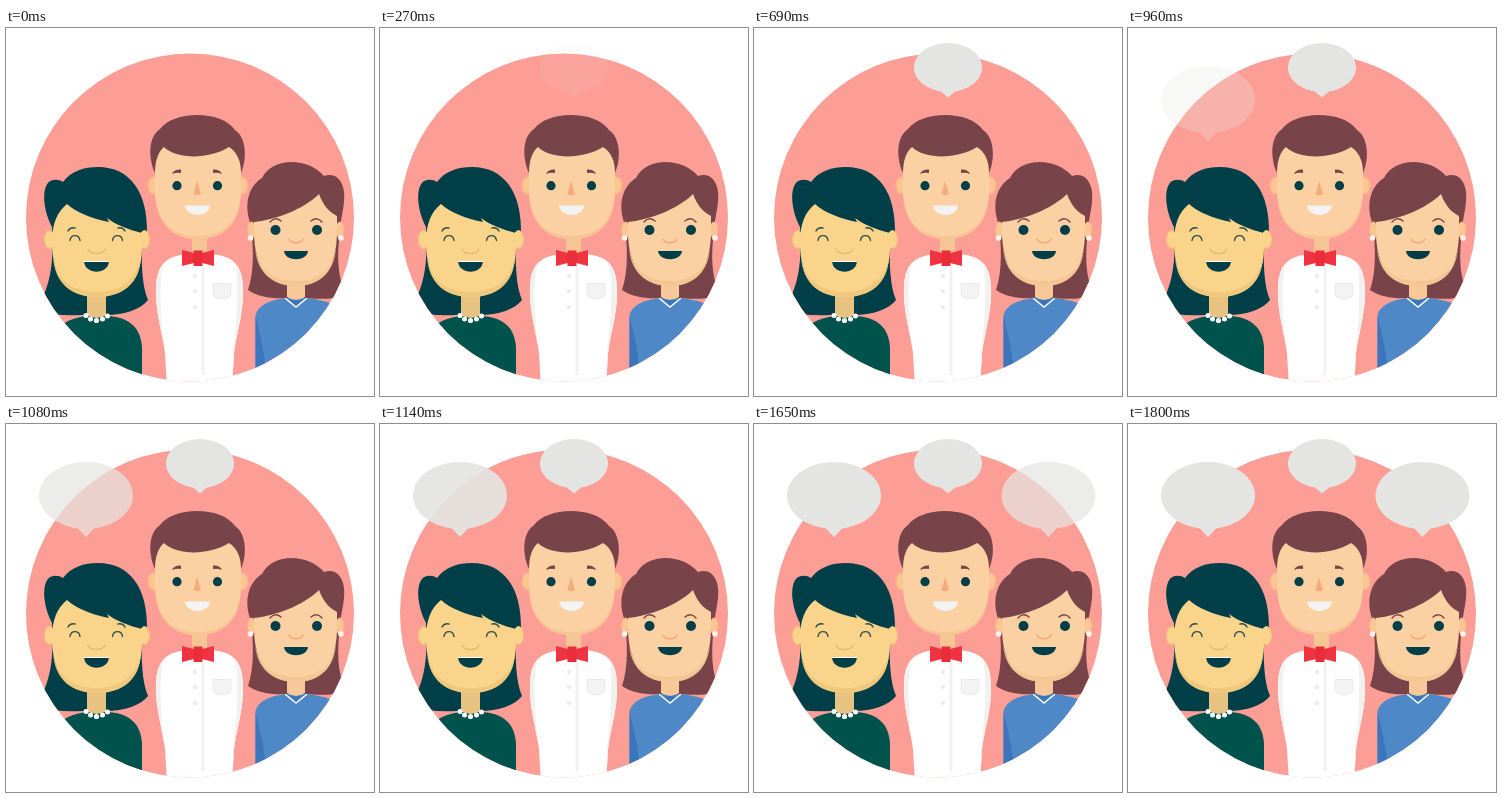
These frames come from a looping animation (368x368 px, 2100 ms). An HTML page:

```html
<!DOCTYPE html>
<html lang="en">
<head>
<meta charset="utf-8">
<title>Three people talking</title>
<style>
html, body { margin: 0; width: 100%; height: 100%; overflow: hidden; background: #fff; }
svg { display: block; width: 100%; height: 100%; }
.line { fill: none; stroke-width: 1.4; stroke-linecap: round; }
</style>
</head>
<body>
<svg viewBox="0 0 368 368">
  <defs><clipPath id="disc"><circle cx="184" cy="189.5" r="164"/></clipPath></defs>
  <circle cx="184" cy="189.5" r="164" fill="#fc9e96"/>

  <g clip-path="url(#disc)">
    <g id="man">
      <path fill="#fff" d="M186 226C165 227 150 232 150 261C149 282 156 303 159 325L161 360H226L228 325C231 303 238 284 237 261C237 232 222 227 201 226Z"/>
      <path fill="#f1f1f2" d="M229 236C235 243 237 251 237 264C237 284 231 303 228 325L227 342C226 319 231 300 231 276C231 260 232 247 229 236ZM157 238C151 245 150 253 150 264C150 281 154 297 157 313C156 292 152 261 157 238Z"/>
      <path fill="#f1f1f2" d="M195.500 238H198.500V347H195.500Z"/>
      <path fill="#f3f3f4" stroke="#e9eaeb" d="M207 255.500H225V266Q225 270 216 271Q207 270 207 266Z"/>
      <g fill="#eeeeef"><circle cx="189" cy="248" r="2.300"/><circle cx="189" cy="263" r="2.300"/><circle cx="189" cy="279" r="2.300"/></g>
      <path fill="#f6c594" d="M186 204H201V226H186Z"/>
      <path fill="#ef3340" d="M176 222L188 225H196L208 222V238L196 235H188L176 238Z"/>
      <path fill="#e92d3b" d="M187.500 222.500H196.500V238H187.500Z"/>
      <g fill="#fcc594" stroke="#f5b584" stroke-width="1.300"><ellipse cx="147.500" cy="157.500" rx="5.500" ry="8.500"/><ellipse cx="236.500" cy="157.500" rx="5.500" ry="8.500"/></g>
      <path fill="#784449" d="M149 145C143 132 141 110 154 101C161 92 175 87 191 87S222 92 229 102C241 110 241 132 235 145Z"/>
      <path fill="#fbd0a2" d="M149 145C149 133 152 124 158 119C170 131 202 132 223 119C231 124 235 133 235 145V162C235 195 217 211 192 211S149 195 149 162Z"/>
      <path fill="#f6c594" d="M150 173C154 198 171 208 192 208S230 198 234 173C232 198 216 211 192 211S153 198 150 173Z"/>
      <path fill="#784449" d="M166 146Q168 141 175 141.500V145Q170 144 166 146ZM216 146Q214 141 207 141.500V145Q212 144 216 146Z"/>
      <g fill="#003e48"><circle cx="171" cy="157.700" r="4.600"/><circle cx="211.500" cy="157.700" r="4.600"/></g>
      <path fill="#f4ac7c" d="M191 153L187.500 166Q191 168.500 195 166Z"/>
      <path fill="#f3f3f4" d="M179 177.500H204C203 190 180 190 179 177.500Z"/>
    </g>

    <g id="left-woman">
      <path fill="#003e48" d="M46 199C36 180 35 154 47 152Q53 151 57 154C65 143 78 139 92 139C124 139 142 164 141 206L136 207C135 235 136 258 142 272C135 281 119 287 99 287H76Q60 288 48 286L35 273C48 248 47 221 46 199Z"/>
      <path fill="#00534c" d="M81 288H100C124 289 135 300 136 320V360H43L57 296Q65 290 81 288Z"/>
      <path fill="#e8c281" d="M81 258H100V287Q91 293 81 287Z"/>
      <g fill="#f9d48a" stroke="#edc479"><ellipse cx="43.500" cy="211.500" rx="5" ry="9"/><ellipse cx="138.500" cy="211.500" rx="5" ry="9"/></g>
      <path fill="#f9d48a" d="M46 214C46 196 51 184 61 176C70 184 84 190 103 194L101 190C110 197 124 202 136 205V216C137 252 118 269 91 269S46 252 46 214Z"/>
      <path fill="#efc87d" d="M47 229C51 255 70 264 91 264S131 254 135 229C134 256 116 269 91 269S49 256 47 229Z"/>
      <g class="line" stroke="#33504c"><path d="M64 212.500C65 206 73 206 74 212.500M106.500 212.500C107.500 206 115.500 206 116.500 212.500M62 203Q64 199 69 200M119 203Q117 199 112 200"/></g>
      <path class="line" stroke="#e8b870" d="M82 221C84 227 97 227 99 221"/>
      <path fill="#003e48" d="M78 233.500H103C102 247 79 247 78 233.500Z"/>
      <path fill="#fff" d="M78 233H103V234H78Z"/>
      <g fill="#fff"><circle cx="80" cy="287.500" r="2.500"/><circle cx="84.500" cy="291" r="2.500"/><circle cx="90.500" cy="292.500" r="2.600"/><circle cx="96.500" cy="291" r="2.500"/><circle cx="101.500" cy="288" r="2.500"/></g>
    </g>

    <g id="right-woman">
      <path fill="#784449" d="M245 197C237 176 243 158 256 150C266 129 302 129 318 148C333 143 340 158 338 174C337 184 335 190 334 202C331 227 331 248 340 267C327 272 310 271 298 270H282C266 271 252 269 242 262C249 242 247 216 245 197Z"/>
      <path fill="#4e88c7" d="M280 270H300Q328 273 333 282L340 360H249.500V287C252 277 264 272 280 270Z"/>
      <path fill="#3b75bc" d="M249.500 288C253 303 258 320 260 345H249.500Z"/>
      <path fill="#3b75bc" d="M281 268H299L290 279Z"/>
      <path fill="#f8c898" d="M281 249H299V269Q290 275 281 269Z"/>
      <path class="line" stroke="#fff" d="M279.500 270.500L290 279L300.500 270.500"/>
      <g fill="#fcc594" stroke="#f5b584"><ellipse cx="245.500" cy="202" rx="4" ry="8"/><ellipse cx="334" cy="202" rx="4" ry="8"/></g>
      <path fill="#fbd0a2" d="M248 204V194C268 192 297 182 313 166C317 177 323 184 331 188V204C331 241 314 258 290 258S248 241 248 204Z"/>
      <path fill="#f6c594" d="M249 220C253 244 270 253 290 253S326 244 330 220C328 244 314 258 290 258S251 244 249 220Z"/>
      <g class="line" stroke="#784449"><path d="M264 194Q269 188 275 193M305 193Q311 188 316 194"/></g>
      <g fill="#003e48"><circle cx="269.500" cy="202" r="5"/><circle cx="311" cy="202" r="5"/></g>
      <path class="line" stroke="#f4a878" d="M283 211C285 216 295 216 297 211"/>
      <path fill="#003e48" d="M278 223H302C301 234 279 234 278 223Z"/>
      <g fill="#fff3ea"><circle cx="244.500" cy="210" r="2.800"/><circle cx="335" cy="210" r="2.800"/></g>
    </g>
  </g>

  <g fill="#e4e5e3">
    <path class="bubble" data-start="90" d="M187 63.500A34 24.500 0 1 1 201 63.500L194 69.500Z"/>
    <path class="bubble" data-start="690" d="M72 104.500A47 33.500 0 1 1 88 104.500L80 113Z"/>
    <path class="bubble" data-start="1260" d="M286.500 104.500A47 33.500 0 1 1 302.500 104.500L294.500 113Z"/>
  </g>
</svg>
<script>
const LOOP = 2100, STEP = 30, STEPS = 18;
const bubbles = [...document.querySelectorAll('.bubble')];
const began = performance.now();

// Slow start, soft landing.
function ease(progress) {
  const p = progress ** 1.8;
  return p * p * (3 - 2 * p);
}

function draw() {
  const time = (performance.now() - began) % LOOP;
  for (const bubble of bubbles) {
    const step = Math.floor((time - bubble.dataset.start) / STEP) + 1;
    bubble.style.opacity = ease(Math.min(Math.max(step / STEPS, 0), 1));
  }
  requestAnimationFrame(draw);
}
draw();
</script>
</body>
</html>
```
